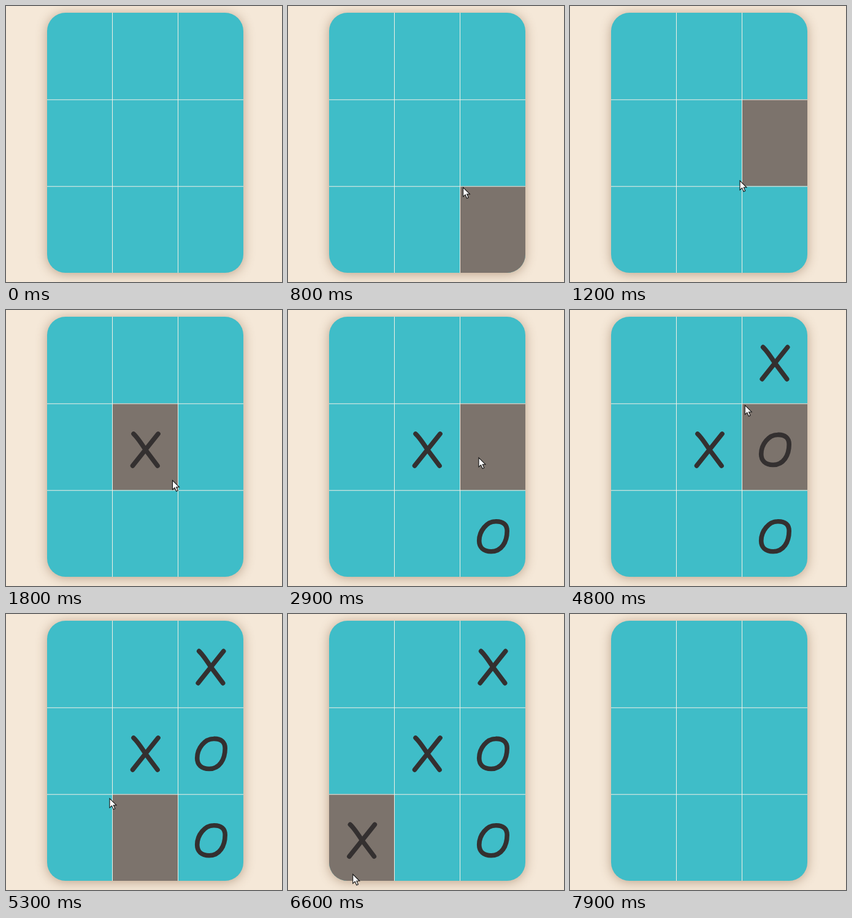
An HTML page with a canvas that plays this animation: 450x450 px, repeating every 8 s.

```html
<!DOCTYPE html>
<html lang="en">
<head>
<meta charset="utf-8">
<title>Tic-tac-toe</title>
<style>
  html, body { margin: 0; width: 100%; height: 100%; overflow: hidden; background: #f5e8d8; }
  canvas { display: block; }
</style>
</head>
<body>
<canvas id="stage" width="450" height="450"></canvas>
<script>
const ctx = document.getElementById('stage').getContext('2d');
const LOOP = 8000, STEP = 100, TRAVEL = 700, REPLY = 500, RESET = 7800;
const PAPER = '#f5e8d8', TEAL = '#3fbdc8', HOVER = '#7c736c', INK = '#343030', LINE = '#f3f0e6';
const BOARD = { x: 67, y: 11, w: 320, h: 424, r: 30 };
const CELL = { w: BOARD.w / 3, h: BOARD.h / 3 };

// Places where the pointer comes to rest, with arrival times
const STOPS = [
  { at: 0, x: 470, y: 350 },
  { at: 800, x: 285, y: 295 },
  { at: 1500, x: 271, y: 277 },
  { at: 2900, x: 310.5, y: 240 },
  { at: 3900, x: 313.5, y: 118.5 },
  { at: 5300, x: 168.5, y: 300 },
  { at: 6000, x: 104, y: 352 },
  { at: 6900, x: 106, y: 470 }
];

// Cells are counted row by row; the reply follows each click
const ROUNDS = [
  { at: 1700, x: 4, o: 8 },
  { at: 3900, x: 2, o: 5 },
  { at: 6000, x: 6 }
];

const CROSS = new Path2D('M-19.5 -26 Q-13 -20 0 0 L19.5 26 M20.5 -26 L-21 26');
const RING = new Path2D('M4 -24.5 C17 -25 23 -19 23 -9 C23 9 14 24.5 -3 24.5 C-16 24.5 -22.5 17 -22.5 7 C-22.5 -9 -10 -24.5 4 -24.5 Z');
const ARROW = new Path2D('M.5 .8 V15.8 L4 12.6 L6.6 18.5 L9.2 17.4 L6.7 11.7 H11.4 Z');

const smooth = p => p * p * (3 - 2 * p);
const mix = (a, b, p) => a + (b - a) * p;

function pointerAt(t) {
  const next = STOPS.findIndex(stop => stop.at > t);
  if (next < 0) return STOPS.at(-1);
  const from = STOPS[next - 1], to = STOPS[next];
  const p = smooth(Math.max(0, 1 - (to.at - t) / TRAVEL));
  return { x: mix(from.x, to.x, p), y: mix(from.y, to.y, p) };
}

function boardPath() {
  ctx.beginPath();
  ctx.roundRect(BOARD.x, BOARD.y, BOARD.w, BOARD.h, BOARD.r);
}

function drawHover({ x, y }) {
  // The hover state trails slightly behind the pointer tip
  const col = Math.floor((x + 7 - BOARD.x) / CELL.w);
  const row = Math.floor((y - BOARD.y) / CELL.h);
  if (Math.min(col, row) < 0 || Math.max(col, row) > 2) return;
  ctx.fillStyle = HOVER;
  ctx.fillRect(BOARD.x + col * CELL.w, BOARD.y + row * CELL.h, CELL.w, CELL.h);
}

function drawBoard(pointer) {
  ctx.save();
  ctx.shadowColor = 'rgba(110, 70, 35, 0.42)';
  ctx.shadowBlur = 18;
  ctx.shadowOffsetY = 2;
  ctx.fillStyle = TEAL;
  boardPath();
  ctx.fill();
  ctx.restore();

  ctx.save();
  boardPath();
  ctx.clip();
  drawHover(pointer);
  ctx.fillStyle = LINE;
  for (const i of [1, 2]) {
    ctx.fillRect(Math.floor(BOARD.x + i * CELL.w), BOARD.y, 1, BOARD.h);
    ctx.fillRect(BOARD.x, BOARD.y + i * CELL.h, BOARD.w, 1);
  }
  ctx.restore();
}

function drawMark(path, cell) {
  ctx.save();
  ctx.translate(BOARD.x + (cell % 3 + 0.505) * CELL.w, BOARD.y + (Math.floor(cell / 3) + 0.535) * CELL.h);
  ctx.strokeStyle = INK;
  ctx.lineWidth = 7.6;
  ctx.lineCap = ctx.lineJoin = 'round';
  ctx.stroke(path);
  ctx.restore();
}

function drawMarks(t) {
  if (t >= RESET) return;
  for (const { at, x, o } of ROUNDS) {
    if (t >= at) drawMark(CROSS, x);
    if (o !== undefined && t >= at + REPLY) drawMark(RING, o);
  }
}

function drawPointer({ x, y }) {
  ctx.save();
  ctx.translate(x, y);
  ctx.fillStyle = '#fff';
  ctx.strokeStyle = '#111';
  ctx.lineWidth = 1.1;
  ctx.fill(ARROW);
  ctx.stroke(ARROW);
  ctx.restore();
}

function render(time) {
  const t = Math.floor(time % LOOP / STEP) * STEP;
  const pointer = pointerAt(t);
  ctx.fillStyle = PAPER;
  ctx.fillRect(0, 0, 450, 450);
  drawBoard(pointer);
  drawMarks(t);
  drawPointer(pointer);
}

const start = performance.now();
function tick() {
  render(performance.now() - start);
  requestAnimationFrame(tick);
}
tick();
</script>
</body>
</html>
```
